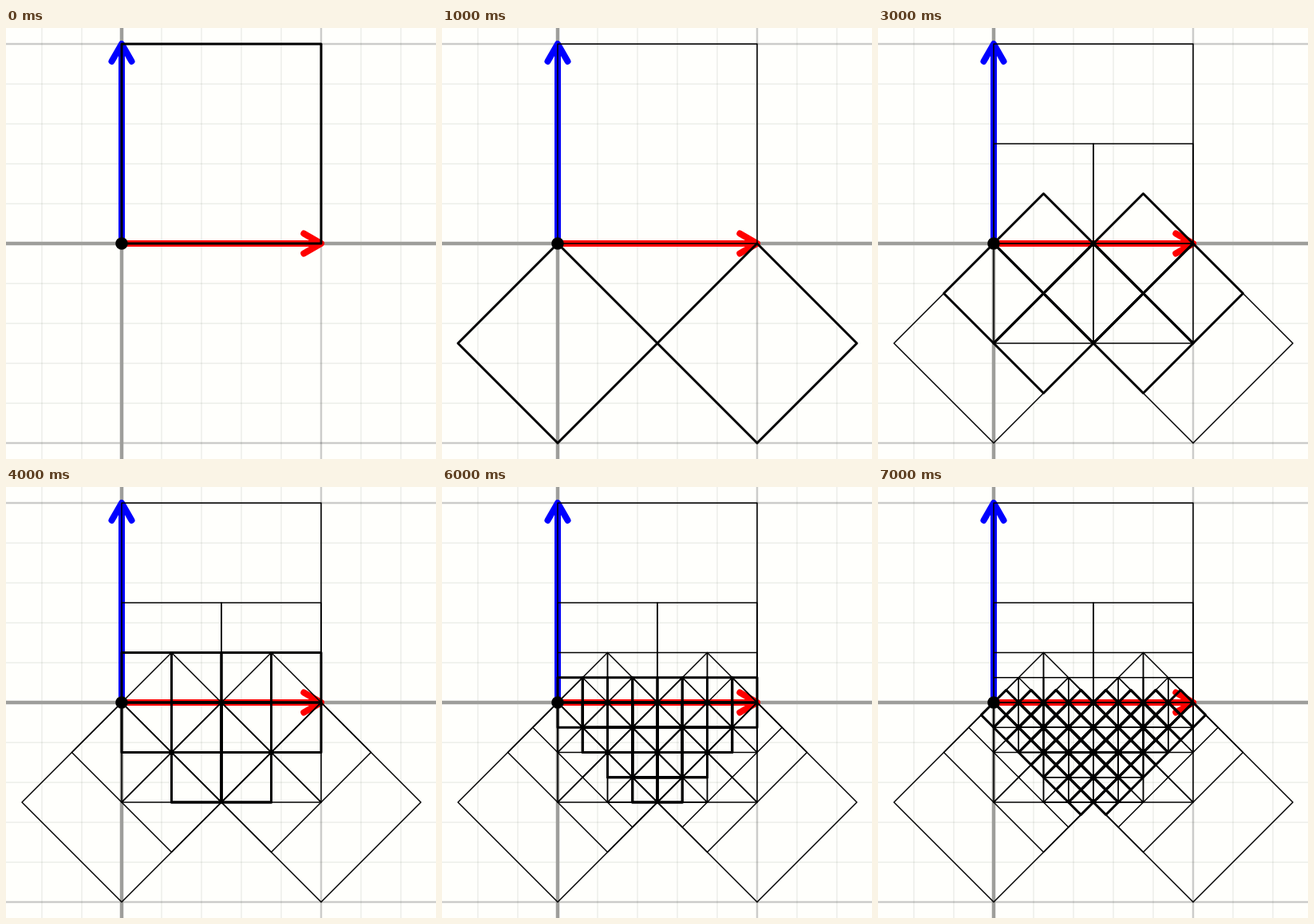
An HTML page with a canvas for the animation above (8000 ms loop, 539 by 540 pixels).

```html
<!DOCTYPE html>
<html lang="en">
<head>
<meta charset="utf-8">
<title>Dragon of squares</title>
<style>
  html, body { margin: 0; width: 100%; height: 100%; overflow: hidden; background: #fffffc; }
  canvas { display: block; }
</style>
</head>
<body>
<canvas id="stage" width="539" height="540"></canvas>
<script>
const W = 539, H = 540, OX = 145, OY = 270, UNIT = 250;
const LEVELS = 8, STEP = 1000;
const ctx = document.getElementById('stage').getContext('2d');

const px = x => OX + x * UNIT;
const py = y => OY - y * UNIT;

function path(points, color, width, closed) {
  ctx.beginPath();
  for (const [x, y] of points) ctx.lineTo(x, y);
  if (closed) ctx.closePath();
  ctx.strokeStyle = color;
  ctx.lineWidth = width;
  ctx.stroke();
}

// Each segment is replaced by two legs that meet on its right side.
function split([x1, y1, x2, y2]) {
  const dx = (x2 - x1) / 2, dy = (y2 - y1) / 2;
  const ax = x1 + dx + dy, ay = y1 + dy - dx;
  return [[ax, ay, x1, y1], [x2, y2, ax, ay]];
}

const levels = [[[0, 0, 1, 0]]];
while (levels.length < LEVELS) levels.push(levels[levels.length - 1].flatMap(split));

// Square standing on the left side of a segment.
function square([x1, y1, x2, y2], width) {
  const dx = x2 - x1, dy = y2 - y1;
  const corners = [[x1, y1], [x2, y2], [x2 - dy, y2 + dx], [x1 - dy, y1 + dx]];
  path(corners.map(([x, y]) => [px(x), py(y)]), '#000', width, true);
}

function gridLines(step, color, width, skip) {
  for (let x = OX % step; x < W; x += step)
    if (!skip(x - OX)) path([[x, 0], [x, H]], color, width);
  for (let y = OY % step; y < H; y += step)
    if (!skip(y - OY)) path([[0, y], [W, y]], color, width);
}

function arrow(angle, color) {
  ctx.save();
  ctx.translate(OX, OY);
  ctx.rotate(angle);
  ctx.lineCap = 'butt';
  path([[0, 0], [UNIT, 0]], color, 8);
  ctx.lineCap = 'round';
  path([[UNIT - 21.7, -12.5], [UNIT, 0], [UNIT - 21.7, 12.5]], color, 8);
  ctx.restore();
}

function draw(level) {
  ctx.fillStyle = '#fffffc';
  ctx.fillRect(0, 0, W, H);
  ctx.lineJoin = 'round';
  gridLines(50, 'rgba(20,40,20,.09)', 1.25, d => d % UNIT === 0);
  gridLines(UNIT, 'rgba(0,0,0,.2)', 2.5, d => d === 0);
  path([[OX, 0], [OX, H]], '#9e9e9b', 4.5);
  path([[0, OY], [W, OY]], '#9e9e9b', 4.5);

  arrow(0, '#f00');
  arrow(-Math.PI / 2, '#00f');

  for (let i = 0; i <= level; i++)
    for (const seg of levels[i]) square(seg, i === level ? 3 : 1.5);

  ctx.fillStyle = '#000';
  ctx.beginPath();
  ctx.arc(OX, OY, 7.8, 0, Math.PI * 2);
  ctx.fill();
}

let shown = -1;
const start = performance.now();
function tick() {
  const level = Math.floor((performance.now() - start) / STEP) % LEVELS;
  if (level !== shown) draw(shown = level);
  requestAnimationFrame(tick);
}
tick();
</script>
</body>
</html>
```
